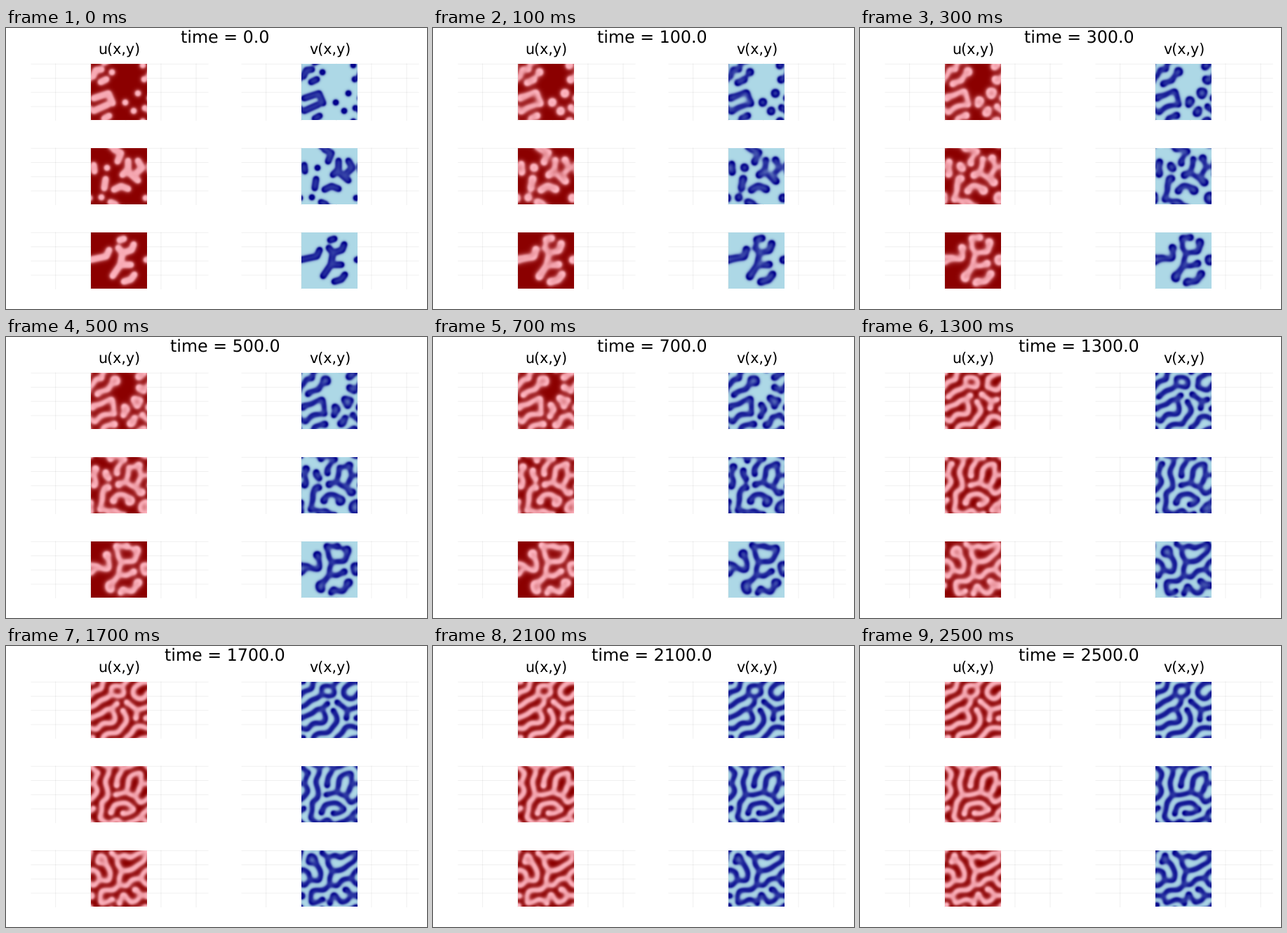
Animation of 600 by 400 pixels, one loop 2600 ms. Source, as a matplotlib script:

```python
import numpy as np
import matplotlib.pyplot as plt
from matplotlib.animation import FuncAnimation
from matplotlib.colors import LinearSegmentedColormap

plt.rcParams["text.hinting"] = "none"

# Gray-Scott reaction-diffusion on three periodic 80 x 80 grids
N = 80
FRAMES, STEP, WARMUP = 26, 100, 30
DU, DV, FEED, KILL = 0.25, 0.125, 0.06, 0.062
DT = 0.5

# Key points of the first worms and dots (y down); all later growth is simulated
WORMS = {
    "top": [
        [(3, 18), (7, 9), (15, 8)], [(14, 26), (22, 22)], [(30, 12)],
        [(4, 49), (25, 42), (31, 56)], [(4, 67), (24, 58)], [(19, 78), (26, 74)],
        [(74, 2)], [(76, 22)], [(67, 42)], [(49, 55)], [(61, 67)], [(77, 63)],
    ],
    "middle": [
        [(33, 2), (43, 7), (38, 19)], [(23, 28)], [(4, 24), (5, 33)],
        [(53, 18), (53, 30), (45, 38)], [(53, 34), (67, 46)],
        [(62, 38), (73, 28), (67, 18)], [(21, 44), (19, 57)],
        [(33, 59), (43, 54), (53, 58)], [(15, 70)], [(28, 77), (35, 80)],
        [(78, 71)],
    ],
    "bottom": [
        [(41, 11), (47, 9)], [(61, 17), (58, 25), (46, 29)],
        [(39, 22), (45, 29), (42, 46), (31, 62)], [(42, 46), (57, 46)],
        [(26, 25), (22, 34), (-1, 39)], [(62, 60), (57, 67), (47, 70)],
    ],
}

rows, cols = np.mgrid[0:N, 0:N] + 0.5


def wrap(d):
    return (d + N / 2) % N - N / 2


def distance2(path):
    """Squared distance from every cell to a polyline on the periodic grid."""
    nearest = np.full((N, N), np.inf)
    for (x0, y0), (x1, y1) in zip(path, path[1:] or path):
        for s in np.linspace(0, 1, 16):
            dx = wrap(cols - x0 - s * (x1 - x0))
            dy = wrap(rows - y0 - s * (y1 - y0))
            nearest = np.minimum(nearest, dx * dx + dy * dy)
    return nearest


def seed(worms, radius=4.9):
    nearest = np.min([distance2(path) for path in worms], axis=0)
    return np.exp(-nearest / radius ** 2)


def laplacian(a):
    return (np.roll(a, 1, 1) + np.roll(a, -1, 1)
            + np.roll(a, 1, 2) + np.roll(a, -1, 2) - 4 * a)


def react(u, v, duration):
    for _ in range(int(duration / DT)):
        uvv = u * v * v
        u, v = (u + DT * (DU * laplacian(u) - uvv + FEED * (1 - u)),
                v + DT * (DV * laplacian(v) + uvv - (FEED + KILL) * v))
    return u, v


def simulate():
    bump = np.array([seed(worms) for worms in WORMS.values()])
    states = [react(1 - 0.5 * bump, 0.36 * bump, WARMUP)]
    while len(states) < FRAMES:
        states.append(react(*states[-1], STEP))
    return states


states = simulate()

fig = plt.figure(figsize=(6, 4), dpi=100, facecolor="white")
ax = fig.add_axes([0, 0, 1, 1])
ax.axis("off")

CMAPS = [LinearSegmentedColormap.from_list("u", ["lightpink", "darkred"]),
         LinearSegmentedColormap.from_list("v", ["lightblue", "darkblue"])]
GRID = dict(color="black", alpha=0.06, linewidth=0.72, zorder=1, snap=False)


def label(x, baseline, text, pixels):
    return ax.text(x, baseline, text, fontsize=pixels * 0.72, color="black",
                   family="DejaVu Sans", ha="center", va="baseline")


def draw_grid(left, top):
    for i in range(5):
        x = left - 50.4 + 50.1 * i
        ax.plot([x, x], [top, top + 80.5], **GRID)
    for i in range(4):
        y = top + 0.3 + 20.2 * i
        ax.plot([left - 85, left + 167], [y, y], **GRID)


images = []
for field, name in enumerate(("u(x,y)", "v(x,y)")):
    left = 121 + 300 * field
    label(left + 40.8, 38, name, 20.7)
    for panel in range(len(WORMS)):
        top = 51 + 120 * panel
        draw_grid(left, top)
        image = ax.imshow(states[0][field][panel], cmap=CMAPS[field],
                          extent=(left, left + N, top + N, top),
                          interpolation="nearest", aspect="auto", zorder=2)
        images.append((image, field, panel))

title = label(312, 21, "", 23.7)
ax.set_xlim(0, 600)
ax.set_ylim(400, 0)


def draw(frame):
    for image, field, panel in images:
        data = states[frame][field][panel]
        image.set_data(data)
        image.set_clim(data.min(), data.max())
    title.set_text(f"time = {frame * STEP:.1f}")
    return [title] + [item[0] for item in images]


anim = FuncAnimation(fig, draw, frames=FRAMES, interval=100,
                     repeat=True, repeat_delay=0, blit=False)
plt.show()
```
